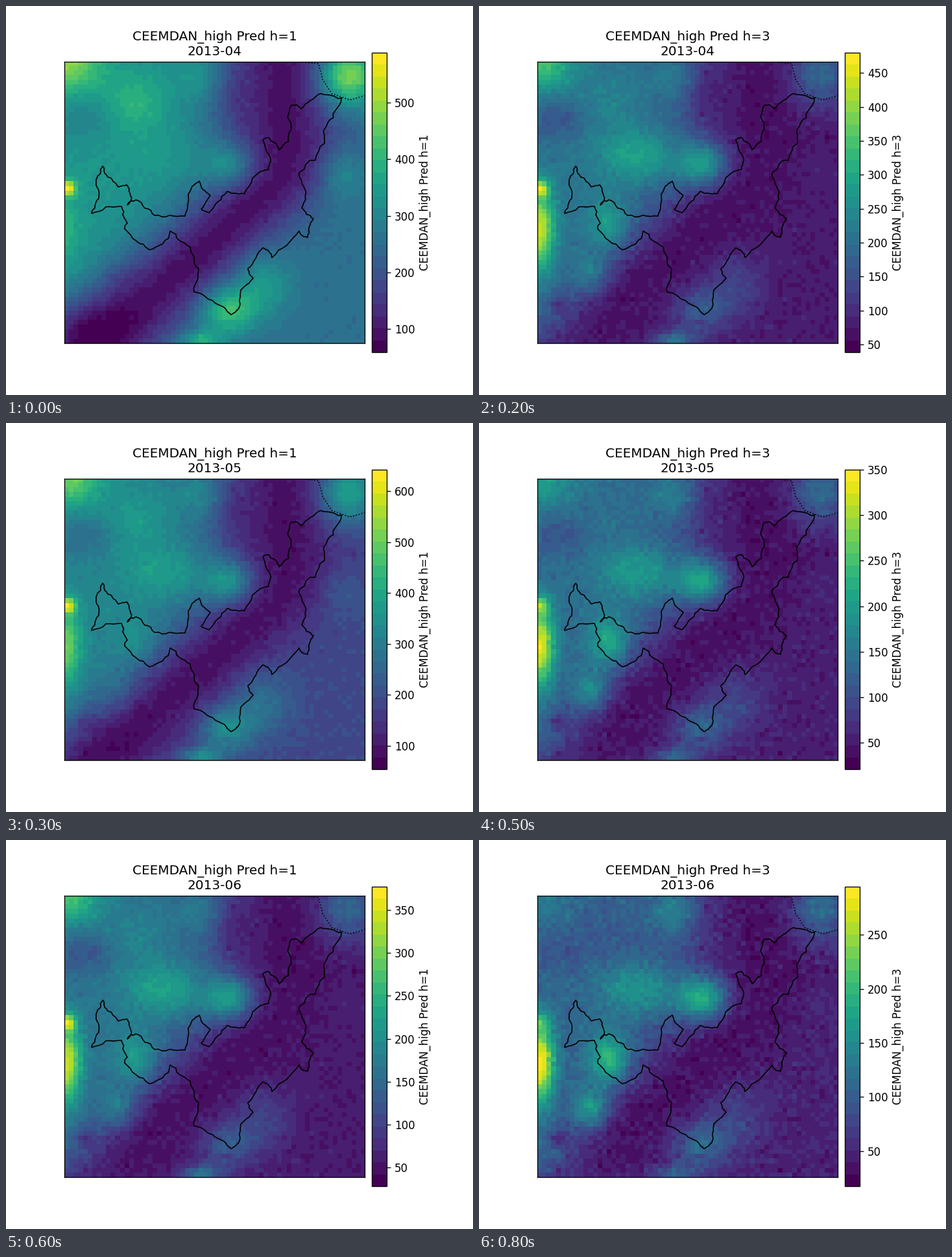
A matplotlib script that plays this animation: 720x600 px, repeating every 0.9 s.

```python
import numpy as np
import matplotlib.pyplot as plt
from matplotlib.animation import FuncAnimation

COLS, ROWS = 65, 61
LEFT, RIGHT, TOP, BOTTOM = 90, 553.14, 85.7, 520.3
KEY_MONTHS = (0, 2, 4)

# Colour limits for each issue month and lead time
LIMITS = [(58.5, 588.7), (72, 785), (38.5, 480),
          (54, 642), (20.5, 459.5), (21, 350),
          (28.5, 377), (22, 325), (17.45, 294.6)]

# Corners of the region's border; the fine detail is added by rough()
NORTH = [(517, 142), (485, 135), (455, 159), (440, 153), (440, 190), (421, 222),
         (405, 203), (396, 206), (407, 232), (405, 252), (367, 290), (341, 286),
         (313, 319), (301, 313), (315, 292), (298, 270), (281, 290), (276, 324),
         (229, 323), (200, 299), (187, 307), (192, 291), (186, 276), (173, 279),
         (157, 264), (149, 247), (139, 268), (143, 297), (132, 320)]
SOUTH = [(132, 320), (178, 309), (183, 344), (221, 376), (253, 347), (284, 372),
         (297, 405), (290, 441), (322, 458), (347, 476), (359, 466), (362, 438),
         (381, 420), (373, 405), (396, 373), (410, 388), (452, 347), (465, 357),
         (474, 328), (456, 311), (462, 285), (453, 256), (491, 212), (496, 180),
         (517, 142)]
DOTTED = [(462, 87), (482, 89), (488, 113), (502, 135), (530, 145), (554, 138)]

cell = (RIGHT - LEFT) / COLS
gx, gy = np.meshgrid(LEFT + cell * (np.arange(COLS) + 0.5),
                     TOP + cell * (np.arange(ROWS) + 0.5))
rng = np.random.default_rng(4)
grain = rng.normal(0, 1, (ROWS, COLS))


def field(month):
    """Share of the colour range in every cell, months after the first."""
    def at(*keys):
        return np.interp(month, KEY_MONTHS, keys)

    def blob(x, y, rx, ry, *keys):
        return at(*keys) * np.exp(-((gx - x) / rx) ** 2 - ((gy - y) / ry) ** 2)

    # A dark valley runs south, then bends to the south-west
    valley = 428 - 1.08 * 12 * np.logaddexp(0, (gy - 262) / 12)
    u = gx - valley
    side = np.where(u < 0, at(0.46, 0.33, 0.27), at(0.31, 0.03, 0.05))
    width = np.where(u < 0, 110, 90)
    f = 0.06 + side * (1 - np.exp(-(u / width) ** 2))

    f += blob(95, 85, 50, 45, 0.30, 0.32, 0.08)       # north-west corner
    f += blob(200, 150, 50, 45, 0.12, 0.06, -0.04)
    f += blob(120, 175, 45, 35, -0.08, -0.12, -0.06)
    f += blob(245, 230, 60, 40, 0.04, 0.20, 0.20)
    f += blob(300, 110, 32, 35, 0.10, 0.10, 0.18)
    f += blob(345, 245, 38, 32, 0.22, 0.34, 0.44)
    f += blob(345, 140, 28, 45, -0.06, -0.07, 0)
    f += blob(96, 282, 12, 12, 0.45, 0.42, 0.20)      # hot spot
    f += blob(94, 345, 22, 60, 0.10, 0.52, 0.68)      # western edge
    f += blob(200, 340, 30, 40, 0, 0.20, 0.36)
    f += blob(172, 415, 28, 30, -0.05, 0.18, 0.32)
    f += blob(110, 490, 70, 50, -0.14, 0.06, 0.12)
    f += blob(121, 460, 12, 11, 0, -0.14, -0.18)
    f += blob(525, 108, 45, 48, 0.50, 0.25, 0.26)     # north-east corner
    f += blob(515, 260, 35, 40, 0.16, 0.02, 0.02)
    f += blob(340, 470, 40, 35, 0.32, 0.20, 0.24)     # southern tip
    f += blob(300, 515, 30, 15, 0.25, 0.28, 0.20)
    f += blob(395, 430, 45, 50, 0.18, 0.12, 0.11)
    return np.clip(f + (0.007 + 0.004 * month) * grain, 0, 1)


def rough(points, rounds=3, amount=0.09):
    """Split every stretch of a line in two, pushing the middle sideways."""
    line = np.array(points, float)
    for _ in range(rounds):
        step = np.diff(line, axis=0)
        side = np.column_stack([-step[:, 1], step[:, 0]])
        push = rng.normal(0, amount, (len(step), 1))
        middle = line[:-1] + step / 2 + side * push
        line = np.insert(line, np.arange(1, len(line)), middle, axis=0)
    return line


maps = []
for i, (lo, hi) in enumerate(LIMITS):
    issue, lead = divmod(i, 3)
    maps.append(lo + (hi - lo) * field(issue + lead))

fig, ax = plt.subplots(figsize=(6, 5), dpi=120)
image = ax.imshow(maps[0], cmap=plt.get_cmap("viridis", 25),
                  extent=(LEFT, RIGHT, BOTTOM, TOP), interpolation="nearest")
bar = fig.colorbar(image, ax=ax, pad=0.02)
outline = np.vstack([rough(NORTH), rough(SOUTH)])
ax.plot(*outline.T, color="black", lw=1)
ax.plot(*np.array(DOTTED).T, color="black", lw=1, ls=":")
ax.set(xlim=(LEFT, RIGHT), ylim=(BOTTOM, TOP), xticks=[], yticks=[])


def update(i):
    issue, lead = divmod(i, 3)
    name = f"CEEMDAN_high Pred h={lead + 1}"
    image.set_data(maps[i])
    image.set_clim(*LIMITS[i])
    bar.set_label(name, labelpad=3.4)
    ax.set_title(f"{name}\n2013-{issue + 4:02d}")
    return ()


anim = FuncAnimation(fig, update, frames=len(LIMITS), interval=100,
                     repeat=True, repeat_delay=0)
plt.show()
```
